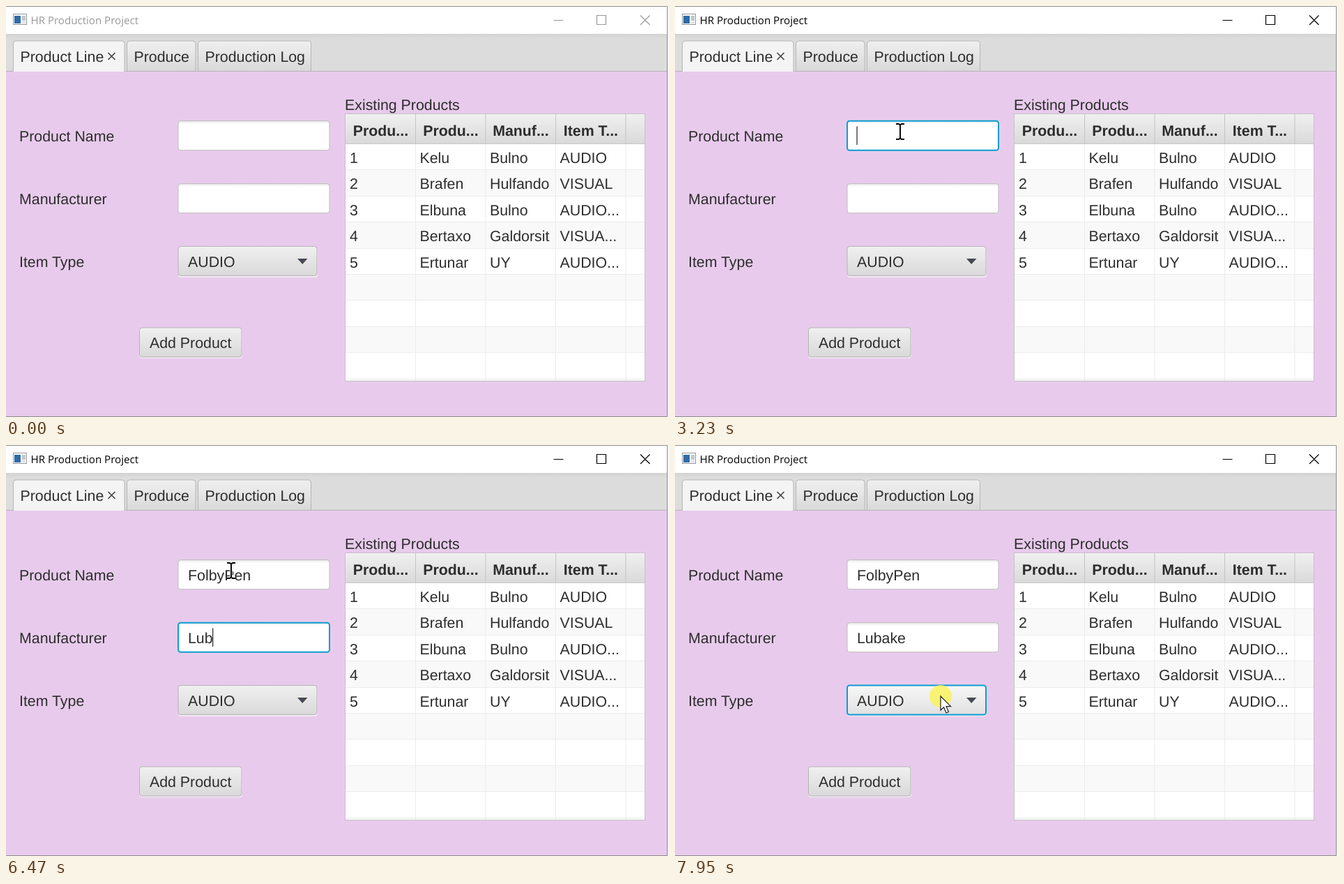
These frames come from a looping animation (951 px wide and 589 px high, 8000 ms). An HTML page:

```html
<!DOCTYPE html>
<html lang="en">
<head>
<meta charset="utf-8">
<title>Product form</title>
<style>
  html, body { margin: 0; width: 100%; height: 100%; overflow: hidden; background: #fff; }
  svg { display: block; width: 100vw; height: 100vh; }
  text { font: 21.33px "Liberation Sans", Arial, sans-serif; fill: #2d2d2d; white-space: pre; text-rendering: geometricPrecision; }
  .head { font-weight: bold; }
  .title { font: 15.1px "Open Sans", "Noto Sans", sans-serif; fill: #999; }
  .chrome { fill: none; stroke: #999; stroke-width: 1.2; }
  .active .title { fill: #000; }
  .active .chrome { stroke: #000; }
  .box { stroke: #bcbcbc; }
  .focused .box { stroke: #0c9dd0; stroke-width: 2; }
  .button { fill: url(#face); stroke: #b3b3b3; }
  .hover .button { fill: url(#light); }
  .shine { fill: #f6eaf8; }
</style>
</head>
<body>
<svg id="stage" viewBox="0 0 951 589" preserveAspectRatio="none">
  <defs>
    <linearGradient id="face" x2="0" y2="1"><stop stop-color="#f0f0f0"/><stop offset="1" stop-color="#d9d9d9"/></linearGradient>
    <linearGradient id="light" x2="0" y2="1"><stop stop-color="#f7f7f7"/><stop offset="1" stop-color="#e1e1e1"/></linearGradient>
    <linearGradient id="strip" x2="0" y2="1"><stop stop-color="#d2d2d2"/><stop offset=".12" stop-color="#dcdcdc"/><stop offset="1" stop-color="#dcdcdc"/></linearGradient>
    <linearGradient id="paper" x2="0" y2="1"><stop stop-color="#ececec"/><stop offset=".12" stop-color="#fff"/></linearGradient>
  </defs>

  <rect width="951" height="589" fill="#f3f3f3"/>
  <rect width="948" height="588" fill="#e8cbec"/>
  <rect width="948" height="41" fill="#fff"/>
  <rect y="40" width="948" height="53" fill="url(#strip)"/>
  <rect y="93" width="948" height="1" fill="#b8b3b9"/>
  <path d="M0 .5H948.5V588.5H0" fill="none" stroke="#8c8c8c"/>

  <g>
    <rect x="10.5" y="11.5" width="19" height="15" fill="#fafafa" stroke="#92979d"/>
    <rect x="12" y="14" width="9" height="11" fill="#2f6ba8"/>
    <rect x="23" y="14" width="5" height="7" fill="#c3c8cd"/>
    <rect x="23" y="22" width="5" height="3" fill="#dfe2e5"/>
  </g>
  <text class="title" x="35.5" y="26">HR Production Project</text>
  <path class="chrome" d="M785.5 20.5H799.5M847.5 13.5H860.5V26.5H847.5ZM910 13.5L923.5 27M923.5 13.5L910 27"/>

  <g id="tabs"></g>
  <path d="M146.500 67L156.500 77M156.500 67L146.500 77" stroke="#444" stroke-width="1.7"/>

  <text x="19" y="194">Product Name</text>
  <text x="19" y="284">Manufacturer</text>
  <text x="19" y="374">Item Type</text>
  <g id="fields"></g>

  <g id="combo">
    <rect class="shine" x="247" y="346" width="200" height="43" rx="4"/>
    <rect class="box button" x="247" y="344.500" width="199" height="42" rx="3.500"/>
    <text x="261" y="374">AUDIO</text>
    <path d="M418 362H432.500L425.200 370Z" fill="#474953"/>
  </g>

  <rect class="shine" x="191" y="462" width="148" height="43" rx="4"/>
  <rect class="button" x="191.500" y="461" width="146.500" height="42" rx="3.500"/>
  <text x="206" y="490">Add Product</text>

  <text x="486" y="149">Existing Products</text>
  <g id="table"></g>

  <rect id="caret" width="1.300" height="26.500" fill="#333"/>
  <circle id="click" r="16" fill="#fbf350" fill-opacity=".78"/>
  <path id="arrow" d="M0 0V20L4.600 15.700L8 24L11.400 22.500L8 14.700H14.500Z" fill="#fff" stroke="#222" stroke-width="1.200"/>
  <g id="beam" fill="none">
    <path id="beamShape" d="M-6-11H-2L0-9.500L2-11H6M0-9.500V9.500M-6 11H-2L0 9.500L2 11H6" stroke="#fff" stroke-width="3.500" stroke-opacity=".7"/>
    <use href="#beamShape"/>
    <path d="M-6-11H-2L0-9.500L2-11H6M0-9.500V9.500M-6 11H-2L0 9.500L2 11H6" stroke="#000" stroke-width="1.900"/>
  </g>
</svg>

<script>
const $ = id => document.getElementById(id);

function add(parent, tag, attrs, content) {
  const el = document.createElementNS("http://www.w3.org/2000/svg", tag);
  for (const key in attrs) el.setAttribute(key, attrs[key]);
  if (content) el.textContent = content;
  return parent.appendChild(el);
}

// Tabs
[["Product Line", 10, 170], ["Produce", 173, 272], ["Production Log", 275, 437.5]].forEach(([label, left, right], i) => {
  add($("tabs"), "path", {
    d: `M${left + .5} ${i ? 93 : 94}V54q0-4 4-4H${right - 4}q4 0 4 4V${i ? 93 : 94}`,
    fill: i ? "url(#face)" : "#f4f4f4", stroke: "#b5b5b5"
  });
  add($("tabs"), "text", { x: left + 10.5, y: 80 }, label);
});

// Table
const edges = [487, 587.5, 688, 788.5, 889, 916.5];
const rows = [
  ["1", "Kelu", "Bulno", "AUDIO"],
  ["2", "Brafen", "Hulfando", "VISUAL"],
  ["3", "Elbuna", "Bulno", "AUDIO..."],
  ["4", "Bertaxo", "Galdorsit", "VISUA..."],
  ["5", "Ertunar", "UY", "AUDIO..."]
];
const rowHeight = 37.4, table = $("table");
add(table, "rect", { x: 486.5, y: 154.5, width: 430, height: 383, fill: "#fff" });
for (let i = 0; i < 10; i++) {
  const y = 197.5 + i * rowHeight;
  if (i % 2) add(table, "rect", { x: 487, y, width: 429.5, height: Math.min(rowHeight, 537.5 - y), fill: "#f9f9f9" });
  add(table, "rect", { x: 487, y: Math.round(y - .5), width: 429.5, height: 1, fill: "#ececec" });
}
add(table, "rect", { x: 487, y: 155, width: 429.5, height: 43, fill: "url(#face)" });
add(table, "rect", { x: 487, y: 197, width: 429.5, height: 1, fill: "#c8c8c8" });
edges.slice(1, 5).forEach(x => {
  add(table, "rect", { x: x - .5, y: 155, width: 1, height: 43, fill: "#c4c4c4" });
  add(table, "rect", { x: x - .5, y: 198, width: 1, height: 339, fill: "#ebebeb" });
});
["Produ...", "Produ...", "Manuf...", "Item T..."].forEach((label, i) =>
  add(table, "text", { class: "head", x: (edges[i] + edges[i + 1]) / 2 + .2, y: 185.5, "text-anchor": "middle" }, label));
rows.forEach((cells, r) => cells.forEach((cell, c) =>
  add(table, "text", { x: 493 + c * 100.5, y: 225 + r * rowHeight }, cell)));
add(table, "rect", { x: 486.5, y: 154.5, width: 430, height: 383, fill: "none", stroke: "#c6c0c8" });

// Text fields: each key time types one more letter
const fields = [
  { top: 165, value: "FolbyPen", keys: [4230, 4530, 4610, 4760, 4840, 5160, 5390, 5540], from: 1130, to: 5770 },
  { top: 255, value: "Lubake", keys: [6170, 6400, 6470, 6640, 6790, 6870], from: 5770, to: 7950 }
];
for (const f of fields) {
  f.group = add($("fields"), "g", {});
  add(f.group, "rect", { class: "box", x: 247, y: f.top - .3, width: 217, height: 42, rx: 3.5, fill: "url(#paper)" });
  f.text = add(f.group, "text", { x: 261, y: f.top + 29 });
}

const LOOP = 8000;
const caretToggles = [1130, 1760, 2220, 2680, 3230, 3690, 4150, 7330, 7800, 7950];
const moves = [
  [890, 323, 180], [7330, 329, 189], [7410, 341, 217], [7480, 362, 284],
  [7560, 384, 391], [7720, 383, 373], [7800, 381, 360]
];
const within = (t, from, to) => t >= from && t < to;
const show = (el, on) => el.setAttribute("visibility", on ? "visible" : "hidden");
const place = (el, x, y) => el.setAttribute("transform", `translate(${x} ${y})`);

function pointerAt(t) {
  if (t >= 890) return moves.filter(m => m[0] <= t).pop().slice(1);
  const p = Math.max(0, Math.floor((t - 210) / 75.5)) / 9;
  const e = p * p * (3 - 2 * p);
  const bend = (a, b, c) => (1 - e) ** 2 * a + 2 * e * (1 - e) * b + e * e * c;
  return [bend(803, 430, 323), bend(512, 320, 180)];
}

function draw(t) {
  $("stage").classList.toggle("active", t >= 1040);

  for (const f of fields) {
    const focused = within(t, f.from, f.to);
    f.group.classList.toggle("focused", focused);
    f.text.textContent = f.value.slice(0, f.keys.filter(k => k <= t).length);
    if (focused) place($("caret"), 260.4 + f.text.getComputedTextLength(), f.top + 7.5);
  }
  show($("caret"), caretToggles.filter(k => k <= t).length % 2);

  const [x, y] = pointerAt(t);
  const overField = x > 247 && x < 464 && fields.some(f => y > f.top && y < f.top + 42);
  const overCombo = x > 247 && x < 446 && y > 345 && y < 387;
  $("combo").classList.toggle("hover", overCombo);
  $("combo").classList.toggle("focused", t >= 7950);
  show($("arrow"), t >= 210 && !overField);
  show($("beam"), t >= 210 && overField);
  show($("click"), within(t, 1040, 1220) || t >= 7870);
  for (const id of ["arrow", "beam", "click"]) place($(id), x, y);
}

function tick() {
  draw(performance.now() % LOOP);
  requestAnimationFrame(tick);
}
tick();
</script>
</body>
</html>
```
